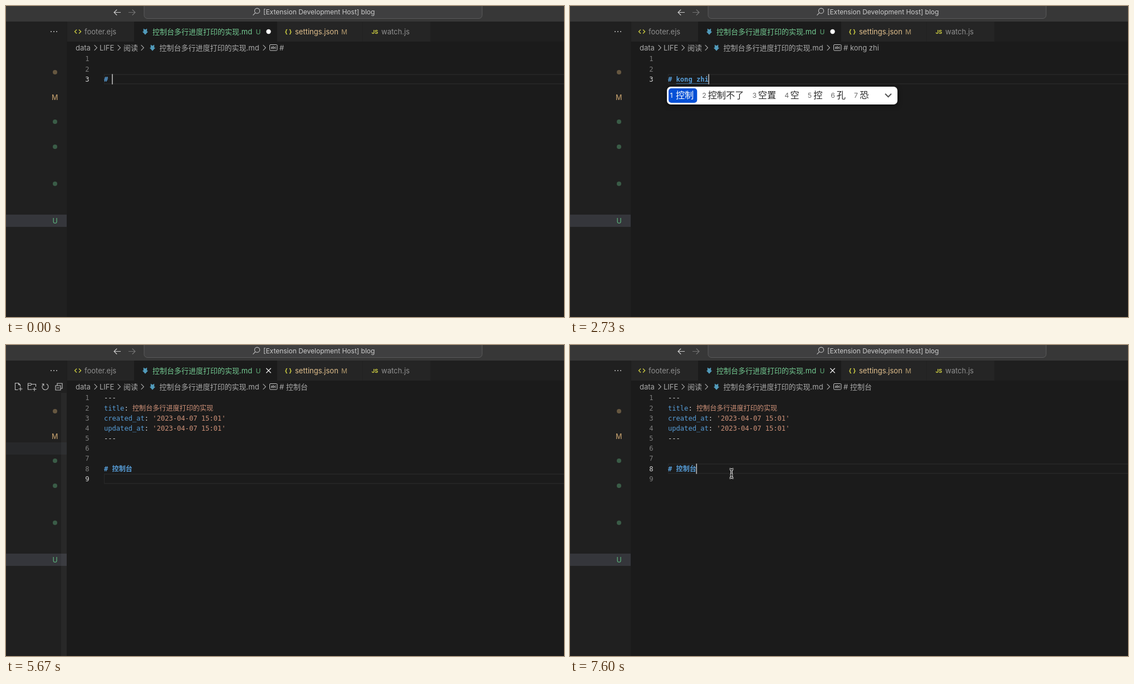
Animation, 1002 px wide and 559 px high, one loop 7670 ms. Source, as an HTML page with a canvas:

```html
<!DOCTYPE html>
<html lang="zh-CN">
<head>
<meta charset="utf-8">
<style>
  html, body { margin: 0; width: 100%; height: 100%; overflow: hidden; background: #1b1b1b; }
  canvas { display: block; }
</style>
</head>
<body>
<canvas id="stage" width="1002" height="559"></canvas>
<script>
const c = document.getElementById('stage').getContext('2d');
const LOOP = 7670;
const UI = 'Inter, "Noto Sans CJK SC", "Noto Sans CJK", sans-serif';
const MONO = '"DejaVu Sans Mono", "Noto Sans CJK SC", "Noto Sans CJK", monospace';
const CODE = '12.1px ' + MONO, BOLD = 'bold ' + CODE;
const YELLOW = '#cbcb41', BLUE = '#519aba', KEY = '#569cd6', STRING = '#ce9178', PLAIN = '#d4d4d4';
const NAME = '控制台多行进度打印的实现', FILE = NAME + '.md';

// Timelines: [start ms, value]
const TYPED = [[0, ''], [1330, 'k'], [1470, 'ko'], [1600, 'kon'], [1730, 'kong'], [2130, 'kong z'],
  [2270, 'kong zh'], [2400, 'kong zhi'], [2800, 'kong zhi t'], [2930, 'kong zhi tai'], [3070, '控制台']];
const CHOICES = [[0, ''], [1400, '看 可 开 快 卡 考 靠 扣 哭'], [1530, '空 🈳 控 孔 恐 箜 崆 倥 悾'],
  [2200, '控制 控制不了 空置 空 控 孔 恐'], [2930, '控制台 控制 空置 空 控 孔 恐'], [3200, '']];
const CRUMB = [[0, '#'], [2730, '# kong zhi'], [3400, '# 控制台']];
const CARET = [[0, 1], [470, 0], [1000, 1], [3670, 0], [4200, 1], [4730, 0], [5000, 1],
  [5600, 0], [6130, 1], [6630, 0], [7130, 1]];
const HOVER_ROW = [[0, -1], [5400, 264], [5530, 219], [5600, 175], [5870, 197], [6070, 175], [6200, -1]];
const POINTER = [[6250, 110, 165], [6400, 295, 94], [6600, 460, 112], [6930, 350, 196], [7200, 300, 222], [7600, 290, 231]];
const SCROLLBAR = [[5400, 0], [5500, 0.09], [6200, 0.09], [6300, 0.33], [6400, 0.32], [6930, 0]];

const at = (steps, t) => steps.filter(s => s[0] <= t).pop()[1];

function tween(keys, t, i = 1) {
  const n = keys.findIndex(k => k[0] > t);
  if (n < 0) return keys[keys.length - 1][i];
  if (n === 0) return keys[0][i];
  const a = keys[n - 1], b = keys[n];
  return a[i] + (b[i] - a[i]) * (t - a[0]) / (b[0] - a[0]);
}

function rect(x, y, w, h, color) {
  c.fillStyle = color;
  c.fillRect(x, y, w, h);
}

function round(x, y, w, h, r, color) {
  c.beginPath();
  c.roundRect(x, y, w, h, r);
  c.fillStyle = color;
  c.fill();
}

// Returns the x where the text ends.
function text(s, x, y, color, font = '13px ' + UI) {
  c.font = font;
  c.fillStyle = color;
  c.fillText(s, x, y);
  return x + c.measureText(s).width;
}

function line(d, color, x = 0, y = 0, width = 1.1) {
  c.save();
  c.translate(x, y);
  c.strokeStyle = color;
  c.lineWidth = width;
  c.stroke(new Path2D(d));
  c.restore();
}

function dot(x, y, color, r = 4) {
  c.beginPath();
  c.arc(x, y, r, 0, 7);
  c.fillStyle = color;
  c.fill();
}

function downIcon(x, y) {
  c.save();
  c.translate(x, y);
  c.fillStyle = BLUE;
  c.fill(new Path2D('M-3.2-5.5L0-3.6L3.2-5.5V0H5.2L0 5.8L-5.2 0H-3.2Z'));
  c.restore();
}

function titleBar() {
  rect(0, 0, 1002, 28, '#373737');
  line('M6-0H-6M-.8-5L-6 0L-.8 5', '#cccccc', 200, 11.5, 1.2);
  line('M-6 0H6M.8-5L6 0L.8 5', '#727272', 226, 11.5, 1.2);
  round(248, -8, 607, 30.5, 6, '#3f3f40');
  c.strokeStyle = '#5a5a5a';
  c.lineWidth = 1;
  c.stroke();
  line('M4.6 0A4.6 4.6 0 1 1-4.6 0A4.6 4.6 0 1 1 4.6 0M-3.2 3.4L-7.5 8', '#c4c4c4', 451, 8.7);
  text('[Extension Development Host] blog', 462, 15.3, '#cccccc', '12px ' + UI);
}

function sidebar(t) {
  rect(0, 28, 109, 531, '#202020');
  const hover = at(HOVER_ROW, t);
  if (hover > 0) rect(0, hover, 109, 22, '#27282a');
  rect(0, 375, 109, 22, '#35363b');
  for (const x of [81, 86, 91]) dot(x, 46, '#c5c5c5', 1);
  dot(88, 119, '#665740');
  for (const y of [208, 253, 319.5]) dot(88, y, '#3a5c47');
  text('M', 82, 168.5, '#b59466', '500 12.5px ' + UI);
  text('U', 83.5, 391, '#59a776', '500 12.5px ' + UI);

  if (t >= 5400 && t < 6270) {
    const gray = '#c5c5c5';
    line('M0 6H-5V-6H1L4-3V0M1-6V-3H4M1 4.5H8M4.5 1V8', gray, 21.5, 74.5);
    line('M0 5H-7V-6H-2L-.5-4.5H7V0M-7-2.5H-2L-.5-4.5M1 4.5H8M4.5 1V8', gray, 46.5, 75);
    line('M-3.3-4.4A5.5 5.5 0 1 0 2.2-5M-6-5H-2.7V-1.6', gray, 70.5, 75);
    line('M-6-2H3V6H-6ZM-3-2V-6H6V3H3M-3.8 2H.8', gray, 95, 75);
  }
  const alpha = tween(SCROLLBAR, t);
  if (alpha > 0) rect(99, 86, 10, 473, `rgba(121,121,121,${alpha})`);
}

function tabs(t) {
  rect(109, 28, 893, 36, '#1f1f1f');
  rect(110, 28, 120, 36, '#252525');
  rect(230, 28, 257, 36, '#1b1b1b');
  rect(487, 28, 153.5, 36, '#252525');
  rect(641, 28, 121, 36, '#252525');
  line('M-2-3.5L-5.5 0L-2 3.5M2-3.5L5.5 0L2 3.5', YELLOW, 129, 46, 1.4);
  text('footer.ejs', 141, 51, '#8f8f8f');
  downIcon(250, 46);
  text(FILE, 263, 51, '#73c991');
  text('U', 448.5, 51, '#559569', '500 12px ' + UI);
  if (t < 5130) dot(471.5, 46, '#ffffff', 4.2);
  else line('M-4.2-4.2L4.2 4.2M4.2-4.2L-4.2 4.2', '#e8e8e8', 471.5, 46, 1.3);
  text('{ }', 500.5, 50, YELLOW, 'bold 11px ' + UI);
  text('settings.json', 519, 51, '#e2c08d');
  text('M', 602, 51, '#9d8762', '500 12px ' + UI);
  text('JS', 656.5, 49.5, YELLOW, 'bold 9.5px ' + UI);
  text('watch.js', 674, 51, '#8f8f8f');
}

function breadcrumbs(t) {
  const gray = '#a9a9a9';
  text('data', 125, 80, gray);
  text('LIFE', 168, 80, gray);
  text('阅读', 211, 80, gray);
  downIcon(263, 75);
  text(FILE, 275.5, 80, gray);
  for (const x of [161, 203, 245, 464]) line('M-2.4-4.8L2.4 0L-2.4 4.8', gray, x, 75);
  c.beginPath();
  c.roundRect(473.5, 69.5, 13.5, 10.5, 1.5);
  c.strokeStyle = '#c5c5c5';
  c.lineWidth = 1;
  c.stroke();
  text('abc', 475.5, 77, '#c5c5c5', 'bold 5.5px ' + UI);
  text(at(CRUMB, t), 491, 80, gray);
}

function editor(t) {
  const saved = t >= 5000;
  const active = !saved ? 3 : t < 7330 ? 9 : 8;
  const mid = n => 95 + 18.17 * (n - 1);
  const top = mid(active) - 9;

  rect(176, top, 826, 1.5, '#282828');
  rect(176, top + 16.8, 826, 1.5, '#282828');
  rect(176, top, 1, 18, '#282828');
  c.textAlign = 'right';
  for (let n = 1; n <= (saved ? 9 : 3); n++)
    text(n, 149.5, mid(n) + 4.4, n === active ? '#d6d6d6' : '#7d7d7d', CODE);
  c.textAlign = 'left';

  const base = n => mid(n) + 4.4;
  if (saved) {
    const pair = (n, key, value) => {
      let x = text(key, 176, base(n), KEY, CODE);
      x = text(': ', x, base(n), PLAIN, CODE);
      text(value, x, base(n), STRING, CODE);
    };
    text('---', 176, base(1), PLAIN, CODE);
    pair(2, 'title', NAME);
    pair(3, 'created_at', "'2023-04-07 15:01'");
    pair(4, 'updated_at', "'2023-04-07 15:01'");
    text('---', 176, base(5), PLAIN, CODE);
  }

  const row = saved ? 8 : 3, typed = at(TYPED, t);
  const start = text('# ', 176, base(row), KEY, BOLD);
  const end = text(typed, start, base(row), KEY, BOLD);
  if (t >= 1330 && t < 3070) rect(start, mid(row) + 7.5, end - start, 1, '#40729b');
  if (at(CARET, t)) rect((active === 9 ? 176.5 : end) - 0.5, top, 1.7, 18.5, '#b4b4b4');
}

function choicePopup(t) {
  const choices = at(CHOICES, t);
  if (!choices) return;
  const big = '16.2px ' + UI;
  c.save();
  if (t >= 3070) c.globalAlpha = 0.4;
  c.shadowColor = 'rgba(0,0,0,.5)';
  c.shadowBlur = 8;
  c.shadowOffsetY = 2;
  round(174, 145, 414, 32, 7, '#ffffff');
  c.shadowColor = 'transparent';
  let x = 179.5;
  choices.split(' ').forEach((word, i) => {
    const left = x + 10.4;
    c.font = big;
    if (i === 0) round(177, 148, left + c.measureText(word).width - 171, 26, 5, '#0450d6');
    text(i + 1, x, 165, i ? '#6b6b6b' : '#ffffff', '12.3px ' + UI);
    if (word === '🈳') {
      round(left + 0.5, 150, 20.5, 20, 3.5, '#2380d8');
      text('空', left + 2.6, 166, '#ffffff', big);
      x = left + 37;
    } else {
      x = text(word, left, 166, i ? '#262626' : '#ffffff', big) + 15;
    }
  });
  line('M-5.5-2.7L0 2.8L5.5-2.7', '#555555', 571.5, 160.5, 2);
  c.restore();
}

function pointer(t) {
  if (t < POINTER[0][0]) return;
  const x = tween(POINTER, t), y = tween(POINTER, t, 2);
  const beam = 'M-3.5-8Q0-8 0-5.5Q0-8 3.5-8M0-6V6M-3.5 8Q0 8 0 5.5Q0 8 3.5 8M-2.5 2.5H2.5';
  line(beam, '#f2f2f2', x, y, 3.6);
  line(beam, '#111111', x, y, 1.3);
}

function draw(now) {
  const t = now % LOOP;
  rect(0, 0, 1002, 559, '#1b1b1b');
  titleBar();
  sidebar(t);
  tabs(t);
  breadcrumbs(t);
  editor(t);
  choicePopup(t);
  pointer(t);
}

const begin = performance.now();
function tick() {
  draw(performance.now() - begin);
  requestAnimationFrame(tick);
}
tick();
</script>
</body>
</html>
```
